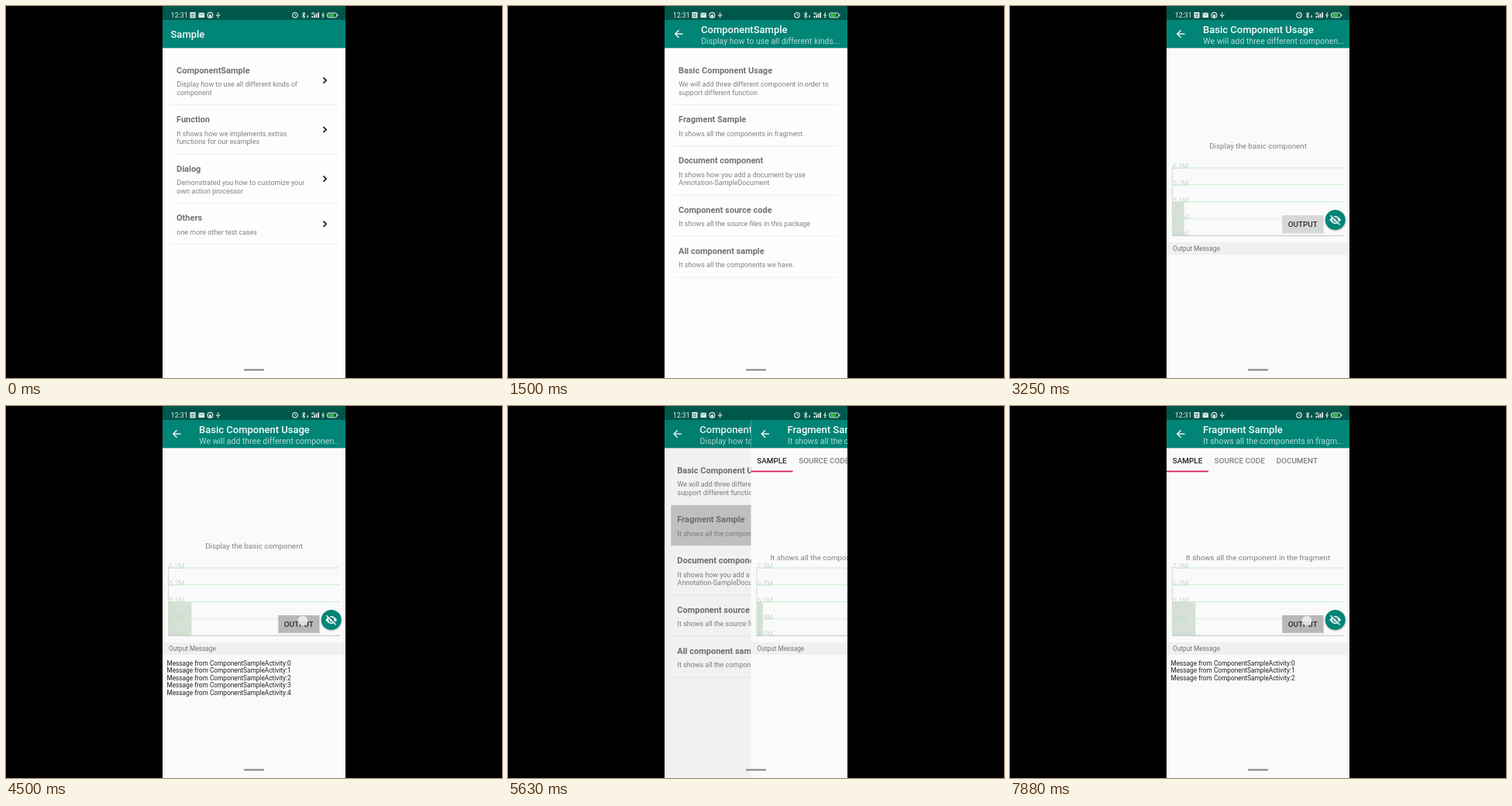
Recreate the animation shown at these times as an HTML page with a canvas. Size 640x480 px, loop 8000 ms.

```html
<!DOCTYPE html>
<html lang="en">
<head>
<meta charset="utf-8">
<title>Component sample app</title>
<style>
html, body { margin: 0; width: 100%; height: 100%; overflow: hidden; background: #000; }
canvas { display: block; width: 640px; height: 480px; }
</style>
</head>
<body>
<canvas id="stage" width="640" height="480"></canvas>
<script>
const ctx = document.getElementById('stage').getContext('2d');
const LOOP = 8000, STEP = 125;
const LEFT = 202, WIDTH = 236, HEIGHT = 480;
const TEAL = '#008577', DARK_TEAL = '#00574b', GREY = '#727272', SOFT = '#808080', LIGHT = '#fafafa';

const PAGES = {
  home: {
    title: 'Sample', arrows: true, presses: [{ row: 0, from: 450, to: 1500 }],
    rows: [
      ['ComponentSample', 'Display how to use all different kinds of', 'component'],
      ['Function', 'It shows how we implements extras', 'functions for our examples'],
      ['Dialog', 'Demonstrated you how to customize your', 'own action processor'],
      ['Others', 'one more other test cases']
    ]
  },
  list: {
    title: 'ComponentSample', sub: 'Display how to use all different kinds...',
    presses: [{ row: 0, from: 2125, to: 3200 }, { row: 1, from: 5300, to: 6350 }],
    rows: [
      ['Basic Component Usage', 'We will add three different component in order to', 'support different function'],
      ['Fragment Sample', 'It shows all the components in fragment.'],
      ['Document component', 'It shows how you add a document by use', 'Annotation-SampleDocument'],
      ['Component source code', 'It shows all the source files in this package'],
      ['All component sample', 'It shows all the components we have.']
    ]
  },
  basic: {
    title: 'Basic Component Usage', sub: 'We will add three different componen...',
    note: 'Display the basic component', noteY: 183.5, opened: 2400,
    axis: { top: 6.2, step: 0.55 }, taps: [3500, 3720, 3950, 4200, 4400]
  },
  fragment: {
    title: 'Fragment Sample', sub: 'It shows all the components in fragm...',
    note: 'It shows all the component in the fragment', noteY: 199, opened: 5550,
    axis: { top: 7.3, step: 0.62 }, taps: [7100, 7480, 7700], tabs: true
  }
};
const MOVES = [
  { at: 693, from: 'home', to: 'list' },
  { at: 2400, from: 'list', to: 'basic' },
  { at: 4650, from: 'basic', to: 'list', back: true },
  { at: 5550, from: 'list', to: 'fragment' }
];
const TOUCHES = [
  { from: 450, to: 650, x: 256, y: 100 },
  { from: 2125, to: 2400, x: 254, y: 102 },
  { from: 5300, to: 5520, x: 254, y: 158 }
];
const tapped = (tap, t) => t >= tap - 60 && t < tap + 190;

function rect(x, y, w, h, color) {
  ctx.fillStyle = color;
  ctx.fillRect(x, y, w, h);
}

function text(str, x, y, size, color, weight = 400, align = 'left') {
  ctx.font = `${weight} ${size}px Roboto, sans-serif`;
  ctx.textAlign = align;
  ctx.fillStyle = color;
  ctx.fillText(str, x, y);
}

function line(points, color, width = 1) {
  ctx.beginPath();
  points.forEach(([x, y], i) => i ? ctx.lineTo(x, y) : ctx.moveTo(x, y));
  ctx.strokeStyle = color;
  ctx.lineWidth = width;
  ctx.stroke();
}

function disc(x, y, r, color) {
  ctx.beginPath();
  ctx.arc(x, y, r, 0, Math.PI * 2);
  ctx.fillStyle = color;
  ctx.fill();
}

function ring(x, y, r, color, width = 1) {
  ctx.beginPath();
  ctx.arc(x, y, r, 0, Math.PI * 2);
  ctx.strokeStyle = color;
  ctx.lineWidth = width;
  ctx.stroke();
}

function header(page) {
  rect(LEFT, 18, WIDTH, 36, TEAL);
  rect(LEFT, 54, WIDTH, 1, '#c4cfcd');
  if (!page.sub) {
    text(page.title, 212.5, 41, 13, LIGHT, 500);
    return;
  }
  line([[225.5, 36], [216, 36]], LIGHT, 1.4);
  line([[220.5, 31.3], [215.8, 36], [220.5, 40.7]], LIGHT, 1.4);
  text(page.title, 249, 34.5, 13, LIGHT, 500);
  text(page.sub, 249.3, 49, 10.5, '#b2dad6');
}

function list(page, t) {
  let y = 64.5;
  page.rows.forEach(([title, ...body], i) => {
    const h = body.length > 1 ? 63.5 : 53;
    if (page.presses.some(p => p.row === i && t >= p.from && t < p.to)) {
      rect(212, y, 215, h - 0.7, '#c8c8c8');
    }
    text(title, 220, y + 22.4, 11, GREY, 700);
    body.forEach((s, n) => text(s, 220.3, y + 39.7 + n * 10.5, 8.95, SOFT));
    if (page.arrows) {
      const c = y + h / 2 - 0.2;
      line([[409.5, c - 3.6], [413.2, c], [409.5, c + 3.6]], '#1c1c1c', 1.7);
    }
    y += h;
    rect(212, y - 1, 215, 1, '#f0f0f0');
  });
}

function chart(page, t) {
  const bars = Math.floor((t - page.opened) / 650) + 1;
  rect(210, 252.5, Math.max(0, bars) * 7.35, 44, '#d6e0d6');
  for (let i = 0; i < 5; i++) {
    const y = 208.8 + i * 21.9;
    line([[209, y], [431, y]], i < 4 ? '#d3efd0' : '#cacaca', 1.2);
    text((page.axis.top - i * page.axis.step).toFixed(1) + 'M', 210, y + 1, 9, '#c4dccb');
  }
  line([[209.5, 207], [209.5, 297]], '#cedace');
}

function eyeButton() {
  disc(420, 277, 14, '#dedede');
  disc(419.7, 276, 13, TEAL);
  ctx.beginPath();
  ctx.moveTo(412.3, 276);
  ctx.quadraticCurveTo(419.7, 265.8, 427.1, 276);
  ctx.quadraticCurveTo(419.7, 286.2, 412.3, 276);
  ctx.fillStyle = LIGHT;
  ctx.fill();
  ring(419.7, 276, 2.8, TEAL, 1.3);
  line([[414.4, 269.3], [426.6, 281.5]], TEAL, 1.8);
  line([[413.4, 270.3], [425.6, 282.3]], LIGHT, 1.4);
}

function detail(page, t) {
  if (page.tabs) {
    text('SAMPLE', 209.8, 73.5, 9.9, '#222222', 500);
    text('SOURCE CODE', 263.7, 73.5, 9.9, SOFT, 500);
    text('DOCUMENT', 343.7, 73.5, 9.9, SOFT, 500);
    rect(LEFT, 83.5, 54, 1.8, '#d81b60');
  }
  text(page.note, 320, page.noteY, 9.8, SOFT, 400, 'center');
  chart(page, t);
  const pressed = page.taps.some(tap => tapped(tap, t));
  rect(351, 271, 54, 23, '#e6e6e6');
  rect(351.3, 270, 53, 22.7, pressed ? '#b8b8b8' : '#d6d7d7');
  text('OUTPUT', 377.8, 285.2, 9.9, '#2c2c2c', 500, 'center');
  eyeButton();
  rect(LEFT, 305, WIDTH, 16, '#f0f0f0');
  text('Output Message', 210, 316, 8.3, GREY);
  page.taps.filter(tap => t >= tap).forEach((_, i) =>
    text('Message from ComponentSampleActivity:' + i, 207.4, 335 + i * 9.4, 8.3, '#222222'));
}

function drawPage(name, t, dx, dim = 0) {
  const page = PAGES[name];
  ctx.save();
  ctx.translate(dx, 0);
  rect(LEFT, 0, WIDTH, HEIGHT, page.rows ? '#fdfdfd' : '#fafafa');
  header(page);
  if (page.rows) list(page, t);
  else detail(page, t);
  ctx.restore();
  rect(LEFT, 0, WIDTH, HEIGHT, `rgba(0, 0, 0, ${dim})`);
}

function statusBar() {
  const w = '#e6f0ee';
  rect(LEFT, 0, WIDTH, 18, DARK_TEAL);
  text('12:31', 212.8, 15, 8.8, w);
  rect(237.5, 8, 7, 7.5, w);
  rect(239, 10, 4, 1, DARK_TEAL);
  rect(239, 12.5, 4, 1, DARK_TEAL);
  rect(248.5, 8.7, 7.5, 6.3, w);
  line([[249, 9.5], [252.2, 12], [255.5, 9.5]], '#4a8a80', 0.8);
  ring(263.4, 11.7, 3.4, w, 1.2);
  disc(263.4, 12.4, 1.6, w);
  rect(262.6, 12.5, 1.6, 3, w);
  line([[273.7, 8], [273.7, 15.5]], w);
  line([[271.6, 10.5], [271.6, 12.5], [275.8, 12.5], [275.8, 10.5]], w, 0.8);
  ring(373, 11.8, 3.3, w, 1.1);
  line([[373, 10], [373, 12], [374.6, 12]], w, 0.9);
  line([[381.8, 9.6], [386, 13.7], [384, 15.6], [384, 8], [386, 9.9], [381.8, 14]], w, 1);
  rect(388.5, 12, 1.3, 3, w);
  for (let i = 0; i < 4; i++) rect(394.5 + i * 2.6, 13 - i * 1.6, 1.7, 2.2 + i * 1.6, w);
  text('4G', 393.8, 10.6, 4, w, 700);
  line([[409.8, 8.6], [408, 12], [410.2, 12], [408.4, 15.2]], w, 1.1);
  ctx.beginPath();
  ctx.roundRect(414.5, 9, 12.3, 5.8, 2);
  ctx.strokeStyle = w;
  ctx.lineWidth = 1;
  ctx.stroke();
  rect(415.5, 10, 8, 3.8, '#35b04a');
  rect(427.4, 10.7, 1, 2.4, w);
}

// The lower page trails the sliding one, shifting and dimming together.
function screen(t) {
  const move = MOVES.filter(m => t >= m.at).pop();
  if (!move) return drawPage('home', t, 0);
  const dt = t - move.at;
  if (dt >= (move.back ? 480 : 800)) return drawPage(move.to, t, 0);
  const rest = Math.exp(-dt / 100);
  const depth = move.back ? 0.9 : 1 - Math.sqrt(rest);
  const [under, over] = move.back ? [move.to, move.from] : [move.from, move.to];
  drawPage(under, t, -5.5 * depth, 0.155 * depth);
  drawPage(over, t, WIDTH * (move.back ? 1 - rest : rest));
}

function touches(t) {
  const spots = TOUCHES.filter(s => t >= s.from && t < s.to);
  const taps = [...PAGES.basic.taps, ...PAGES.fragment.taps];
  if (taps.some(tap => tapped(tap, t))) spots.push({ x: 383, y: 277 });
  spots.forEach(s => disc(s.x, s.y, 6.3, 'rgba(240, 240, 240, 0.85)'));
}

function draw(t) {
  rect(0, 0, 640, HEIGHT, '#000');
  ctx.save();
  ctx.beginPath();
  ctx.rect(LEFT, 0, WIDTH, HEIGHT);
  ctx.clip();
  screen(t);
  statusBar();
  rect(307, 468.5, 26, 2, '#828282');
  touches(t);
  ctx.restore();
}

const start = performance.now();
function tick() {
  const t = (performance.now() - start) % LOOP;
  draw(Math.floor(t / STEP) * STEP);
  requestAnimationFrame(tick);
}
tick();
</script>
</body>
</html>
```
